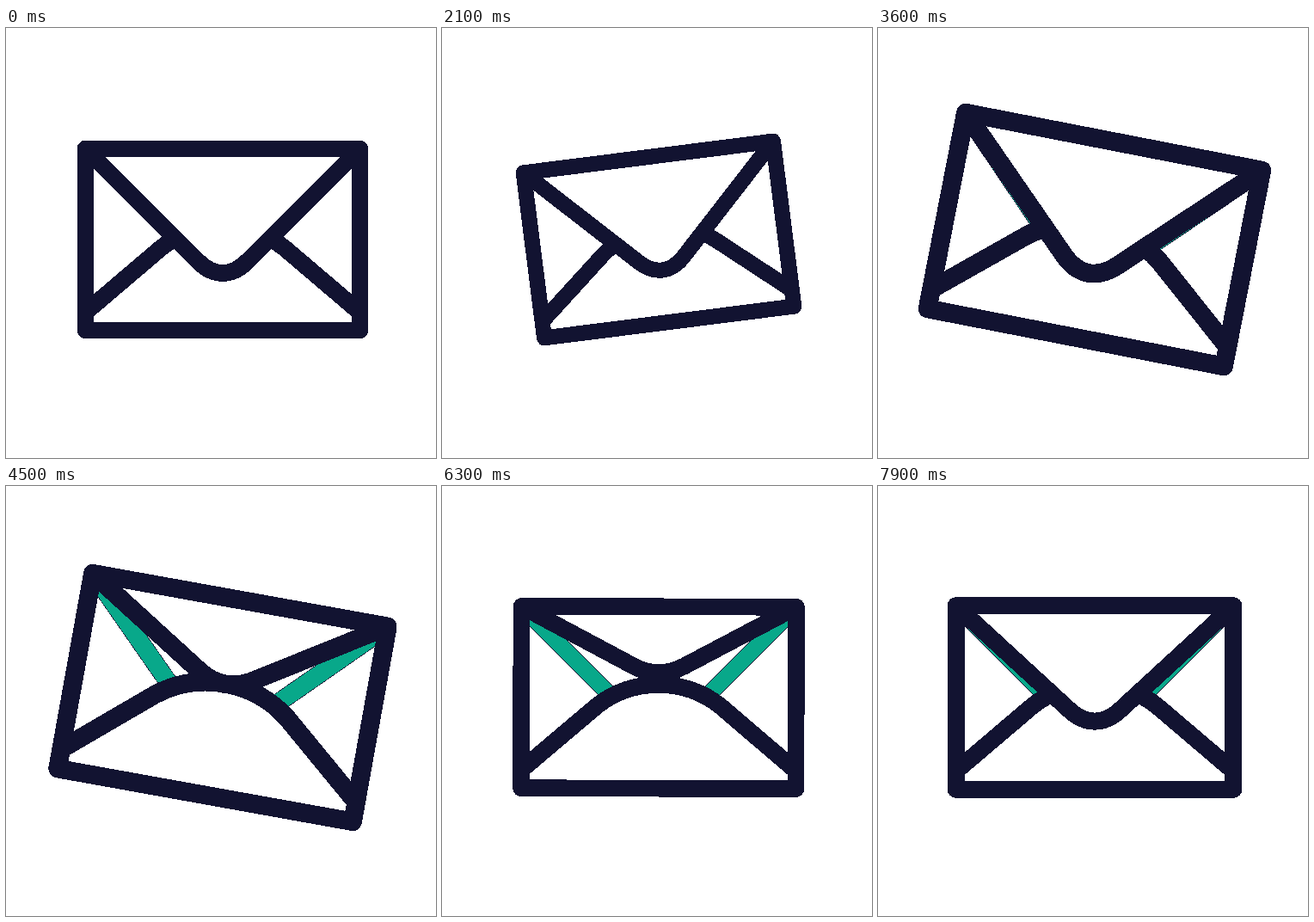
Recreate the animation shown at these times as an HTML page. Size 500 by 500 pixels, loop 8000 ms.

```html
<!DOCTYPE html>
<html lang="en">
<head>
<meta charset="utf-8">
<title>Envelope</title>
<style>
  html, body { margin: 0; width: 100%; height: 100%; overflow: hidden; background: #fff; }
  svg { display: block; width: 100%; height: 100%; }
  path, rect { stroke: #121331; stroke-width: 19.7; stroke-linejoin: round; fill: none; shape-rendering: crispEdges; }
  .paper { stroke: none; fill: #fff; }
  #lining { stroke: #08a88a; stroke-width: 18.4; }
</style>
</head>
<body>
<svg viewBox="0 0 500 500">
  <g id="envelope">
    <path id="liningEdge"/>
    <path id="lining"/>
    <path class="paper" id="pocketPaper"/>
    <path id="pocket"/>
    <path class="paper" id="flapPaper"/>
    <path id="flap"/>
    <rect x="92.5" y="140.5" width="319" height="211"/>
  </g>
</svg>
<script>
const LOOP = 8000, STEP = 100;
const LEFT = 92.5, RIGHT = 411.5, TOP = 140.5, BOTTOM = 351.5;
const CX = (LEFT + RIGHT) / 2, CY = (TOP + BOTTOM) / 2;
const $ = id => document.getElementById(id);

// Smooth progress from 0 to 1 between two times.
function ease(t, from, to) {
  const x = Math.min(1, Math.max(0, (t - from) / (to - from)));
  return x * x * (3 - 2 * x);
}

// Depth 1 is a closed flap; smaller values lift its tip.
function flapPath(depth) {
  const y = drop => TOP + drop * depth;
  return `M${LEFT} ${TOP} L${CX - 29} ${y(130.5)} C${CX - 20} ${y(139.5)} ${CX - 11} ${y(144.5)} ${CX} ${y(144.5)}` +
         ` S${CX + 20} ${y(139.5)} ${CX + 29} ${y(130.5)} L${RIGHT} ${TOP}`;
}

function pocketPath() {
  return `M${LEFT} 330.5 L${CX - 72} 256 C${CX - 47} 236 ${CX - 22} 231 ${CX} 231` +
         ` S${CX + 47} 236 ${CX + 72} 256 L${RIGHT} 330.5`;
}

function draw(t) {
  const shrink = ease(t, 0, 850);
  const grow = ease(t, 1518, 3338);
  const settle = ease(t, 4110, 6460);
  const bounce = 0.025 * ease(t, 7000, 7650) - 0.007 * ease(t, 6460, 7000) - 0.018 * ease(t, 7650, 8300);
  const angle = -13 * shrink + 24 * grow - 11 * settle;
  const scale = 1 - 0.141 * shrink + 0.241 * grow - 0.1 * settle + bounce;
  const lift = ease(t, 3400, 5000) - ease(t, 6050, 8550);

  $("envelope").setAttribute("transform",
    `translate(${CX} ${CY}) rotate(${angle}) scale(${scale}) translate(${-CX} ${-CY})`);
  const flap = flapPath(1 - 0.483 * lift);
  $("flap").setAttribute("d", flap);
  $("flapPaper").setAttribute("d", flap + "Z");
}

$("lining").setAttribute("d", flapPath(1));
$("liningEdge").setAttribute("d", flapPath(1));
$("pocket").setAttribute("d", pocketPath());
$("pocketPaper").setAttribute("d", `${pocketPath()} V${BOTTOM} H${LEFT}Z`);

const start = performance.now();
function tick() {
  const t = (performance.now() - start) % LOOP;
  draw(Math.floor(t / STEP) * STEP);
  requestAnimationFrame(tick);
}
tick();
</script>
</body>
</html>
```
